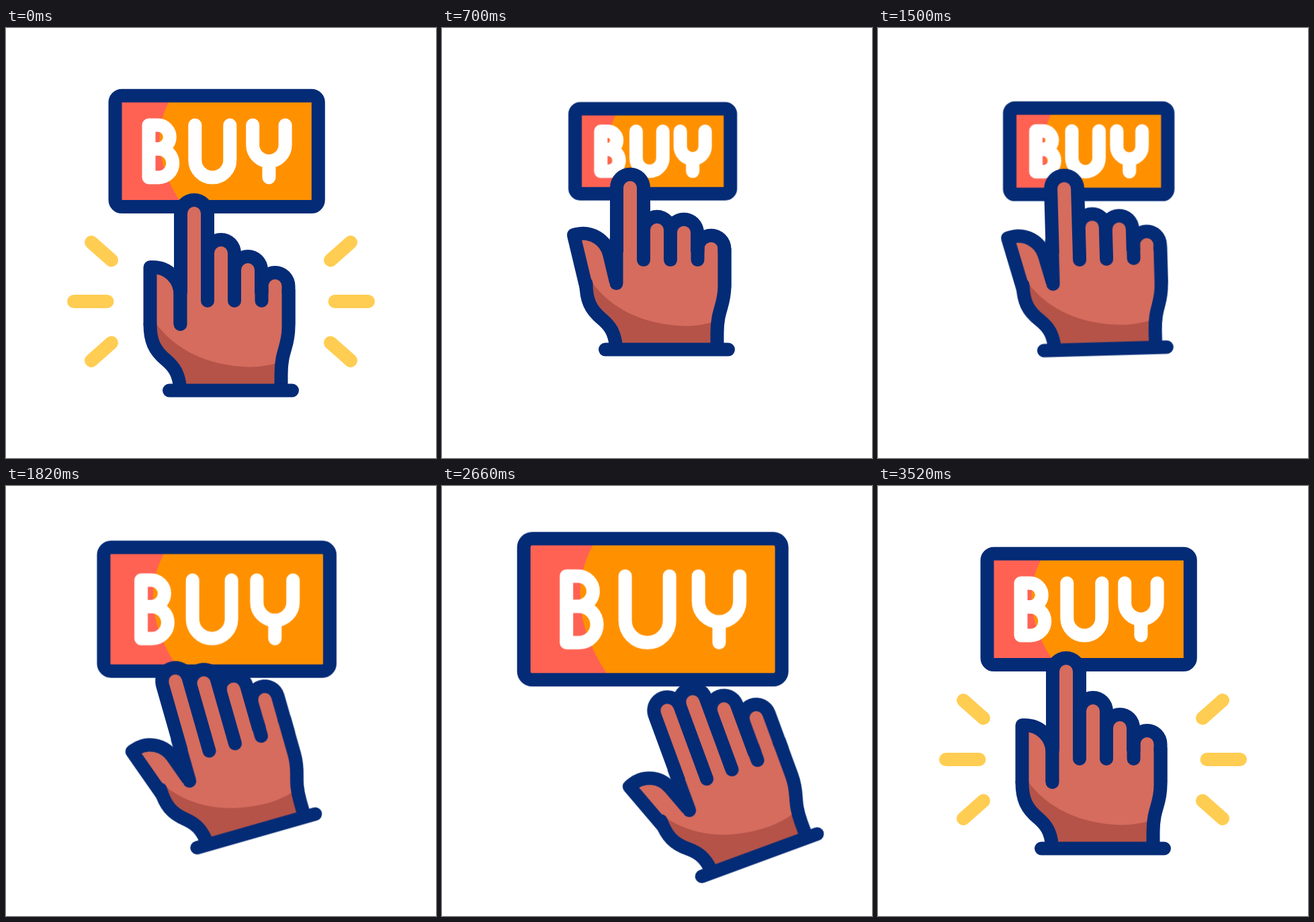
These frames come from a looping animation (640 px wide and 640 px high, 3.6 s). An HTML page without scripts:

```html
<!DOCTYPE html>
<html lang="en">
<head>
<meta charset="utf-8">
<title>Buy button</title>
<style>
  html, body { margin: 0; width: 100%; height: 100%; overflow: hidden; background: #fff; }
  svg { display: block; width: 100%; height: 100%; }

  :root { --navy: #042b76; --skin: #d56c5e; --shade: #b55348; }

  path, rect { stroke-linecap: round; stroke-linejoin: round; fill: none; stroke-width: 20px; }
  .navy { stroke: var(--navy); }
  .skin { fill: var(--skin); }
  .shade { fill: var(--shade); }

  .ray, .button, .hand, .finger, .thumb {
    animation: 3.6s cubic-bezier(.333, 0, .667, 1) infinite;
  }

  .ray { stroke: #ffcd52; stroke-dasharray: 1 2; animation-name: shine; }

  .button { transform-origin: 313.6px 183.4px; animation-name: pulse; }
  .button * { vector-effect: non-scaling-stroke; }
  .letters { stroke: #fff; }

  .hand { transform-origin: 334.5px 539.5px; animation-name: move, tilt; }
  .thumb { transform-origin: 259.5px 441px; animation-name: spread; }
  .finger { animation-name: reach; }
  .finger path { stroke: var(--navy); stroke-width: 60px; }
  .finger path + path { stroke: var(--skin); stroke-width: 20px; }

  .index  { --press: 24.5px; --open: 14px; }
  .middle { --press: 29px; --open: -44px; }
  .ring   { --press: 6px; --open: -43px; }
  .pinky  { --press: 6px; --open: -38px; }

  @keyframes shine {
    0%, 6.11%, 97.78%, 100% { stroke-dashoffset: 0; visibility: visible; }
    13.89%, 89.86% { stroke-dashoffset: 1; visibility: hidden; }
  }
  @keyframes pulse {
    0%, 6.11%, 91.11%, 100% { transform: scale(1); }
    22.22%, 38.89% { transform: scale(.745); }
    30.56% { transform: scale(.88); }
    57.22%, 78.06% { transform: scale(1.27); }
  }
  @keyframes move {
    0%, 6.11%, 91.94%, 100% { translate: 0 0; }
    22.22%, 38.78% { translate: 0 -66px; }
    55.56%, 57.1% { translate: 48px -15.5px; }
    75.5%, 78.89% { translate: 140px 10.5px; }
  }
  @keyframes tilt {
    0%, 38.78%, 91.94%, 100% { rotate: 0deg; }
    55.56%, 78.89% { rotate: -20.2deg; }
  }
  @keyframes spread {
    0%, 6.11%, 91.94%, 100% { rotate: 0deg; }
    22.22%, 38.78% { rotate: -14.6deg; }
    55.56%, 78.89% { rotate: -20.2deg; }
  }
  @keyframes reach {
    0%, 6.11%, 91.94%, 100% { translate: 0 0; }
    22.22%, 38.78% { translate: 0 var(--press); }
    55.56%, 78.89% { translate: 0 var(--open); }
  }
</style>
</head>
<body>
<svg viewBox="0 0 640 640" role="img" aria-label="A hand pressing a BUY button">
  <g>
    <path class="ray" pathLength="1" d="M157 345.5L127 319"/>
    <path class="ray" pathLength="1" d="M150.5 407H101"/>
    <path class="ray" pathLength="1" d="M157 468.5L127 495"/>
  </g>
  <g transform="matrix(-1 0 0 1 640 0)">
    <path class="ray" pathLength="1" d="M157 345.5L127 319"/>
    <path class="ray" pathLength="1" d="M150.5 407H101"/>
    <path class="ray" pathLength="1" d="M157 468.5L127 495"/>
  </g>

  <g class="button">
    <rect x="162.5" y="100.7" width="302.3" height="165.4" rx="10" style="fill:#ff9100"/>
    <path d="M164 101H248C219 145 221 205 265 266H164Z" style="fill:#ff6253"/>
    <rect class="navy" x="162.5" y="100.7" width="302.3" height="165.4" rx="10"/>
    <g class="letters">
      <path d="M212.5 180V144.5H226a17.75 17.75 0 0 1 0 35.5H212.5V222.5H227a21.25 21.25 0 0 0 0-42.5"/>
      <path d="M281.3 144.5V196.5a26 26 0 0 0 52 0V144.5"/>
      <path d="M367.2 144.5V174a24.2 24.2 0 0 0 48.4 0V144.5M391.4 198.2V222.5"/>
    </g>
  </g>

  <g class="hand">
    <path class="thumb navy skin" d="M214.5 441V356H218.5c23 0 41 18 41 41V441"/>

    <g class="finger index"><path d="M280 276V445"/><path d="M280 276V445"/></g>
    <g class="finger middle"><path d="M320 335V445"/><path d="M320 335V445"/></g>
    <g class="finger ring"><path d="M360 360V445"/><path d="M360 360V445"/></g>
    <g class="finger pinky"><path d="M400.5 384V440"/><path d="M400.5 384V440"/></g>

    <!-- palm, its shading, then the lines on top -->
    <path class="skin" d="M214.5 441C214.5 466 221 480 238 494C251 505 257 515 259 535H409.5V515C409.5 480 420.5 475 420.5 445V395H265V441Z"/>
    <path class="shade" d="M214.5 441C214.5 466 221 480 238 494C251 505 257 515 259 535H409.5V497C390 503 375 504.5 360 504.5C300 502 252 480 222 438Z"/>
    <path class="navy" d="M214.5 441C214.5 466 221 480 238 494C251 505 257 515 259 535"/>
    <path class="navy" d="M420.5 390V445C420.5 475 409.5 480 409.5 515V535"/>
    <path class="navy" d="M259.5 375V441M300 370V406M340 370V406M380.5 385V406"/>
    <path class="navy" d="M243 539.5H426"/>
  </g>
</svg>
</body>
</html>
```
